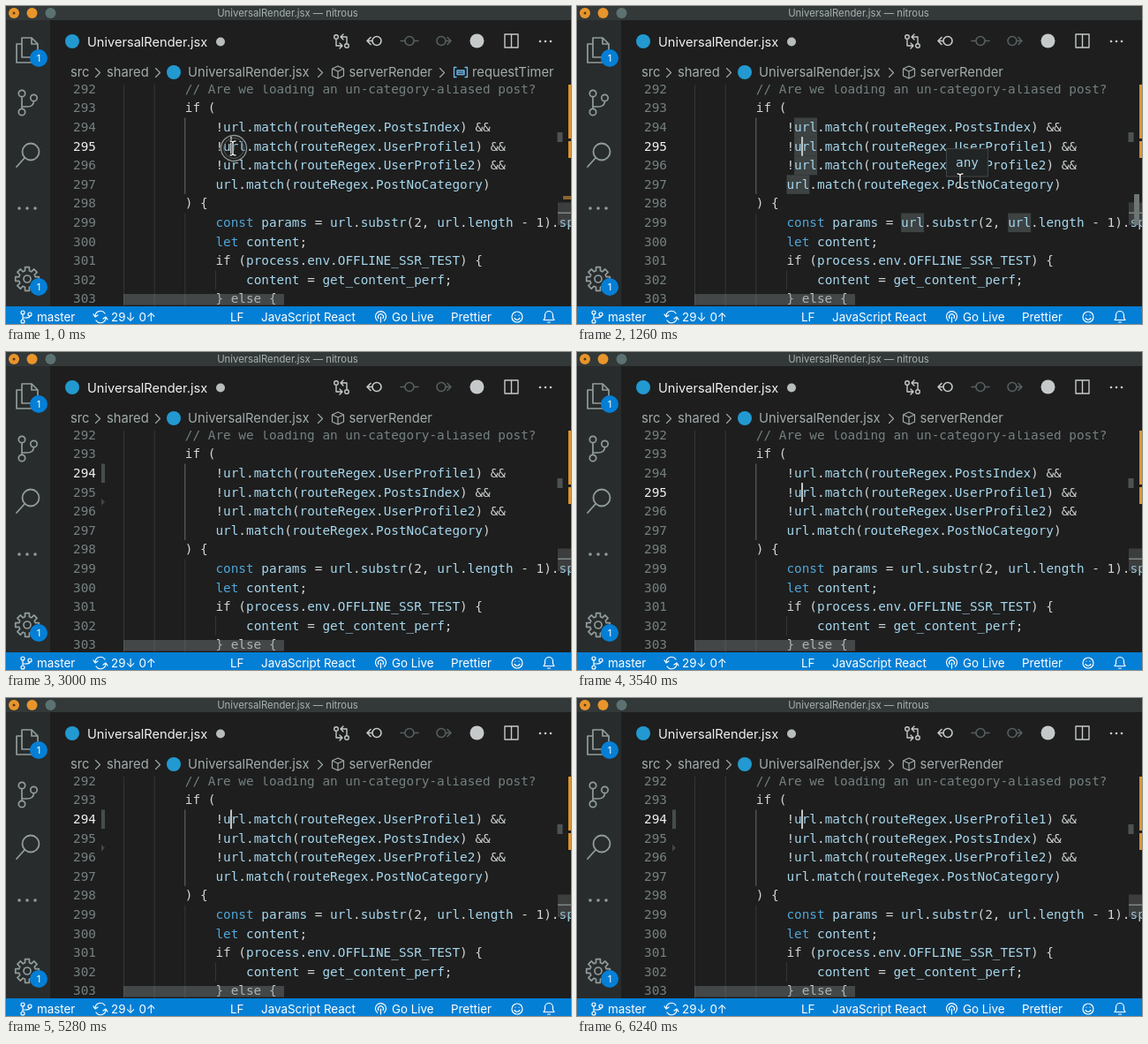
Recreate the animation shown at these times as an HTML page. Size 640 by 360 pixels, loop 6.3 s.

```html
<!DOCTYPE html>
<html lang="en">
<head>
<meta charset="utf-8">
<style>
html, body { margin: 0; width: 100%; height: 100%; overflow: hidden; background: #1e1e1e; }
svg { display: block; width: 640px; height: 360px; }
text { white-space: pre; }
.ui { font-family: Inter, "Open Sans", sans-serif; }
.mono { font: 14.37px "DejaVu Sans Mono", monospace; }
.line { fill: none; stroke-linecap: round; stroke-linejoin: round; }
</style>
</head>
<body>
<svg id="stage" viewBox="0 0 640 360" xmlns="http://www.w3.org/2000/svg"></svg>
<script>
const LOOP = 6300, STEP = 60;
const ROW = 21.6, CHAR = 8.65, FIRST = 292, TOP = 83.3;
const COL = { text: '#d0d4d4', name: '#a5d6ec', keyword: '#4fa6d9', dim: '#758080', bar: '#047fd6', mark: '#2299d0' };
const stage = document.getElementById('stage');

const rowTop = line => TOP + (line - FIRST) * ROW;
const baseline = line => rowTop(line) + 15.45;
const indentX = depth => 133.6 + depth * 4 * CHAR;

const rect = (x, y, w, h, fill, extra = '') =>
  `<rect x="${x}" y="${y}" width="${w}" height="${h}" fill="${fill}" ${extra}/>`;
const dot = (x, y, r, fill) => `<circle cx="${x}" cy="${y}" r="${r}" fill="${fill}"/>`;
const path = (d, color, width = 1.4, extra = '') =>
  `<path class="line" d="${d}" stroke="${color}" stroke-width="${width}" ${extra}/>`;
const ring = (x, y, r) => `M${x - r} ${y}a${r} ${r} 0 1 0 ${2 * r} 0a${r} ${r} 0 1 0 ${-2 * r} 0`;
const label = (x, y, size, fill, words, extra = '') =>
  `<text class="ui" x="${x}" y="${y}" font-size="${size}" fill="${fill}" ${extra}>${words}</text>`;

// Colours identifiers and keywords of one line of code.
const paint = code => code.replace(/[A-Za-z_]\w*|&/g, word => {
  if (word === '&') return '&amp;';
  if (/^(if|else)$/.test(word)) return word;
  const fill = /^(const|let)$/.test(word) ? COL.keyword : COL.name;
  return `<tspan fill="${fill}">${word}</tspan>`;
});
const codeText = (line, depth, body, attrs = '') =>
  `<text class="mono" x="${indentX(depth)}" y="${baseline(line)}" fill="${COL.text}" ${attrs}>${body}</text>`;

const condition = prop => paint(`!url.match(routeRegex.${prop}) &&`);
const fixedLines = [
  [293, 2, 'if ('],
  [297, 3, 'url.match(routeRegex.PostNoCategory)'],
  [298, 2, ') {'],
  [299, 3, 'const params = url.substr(2, url.length - 1).split'],
  [300, 3, 'let content;'],
  [301, 3, 'if (process.env.OFFLINE_SSR_TEST) {'],
  [302, 4, 'content = get_content_perf;'],
  [303, 3, '} else {']
];

function titleBar() {
  return rect(0, 0, 640, 16, '#333838') +
    dot(9, 8, 6, '#e8952c') + dot(9, 8, 1.5, '#5a3a10') + dot(29.5, 8, 6, '#e8952c') + dot(50.5, 8, 6, '#5c7272') +
    label(319, 12, 11.3, '#a8b2b2', 'UniversalRender.jsx — nitrous', 'text-anchor="middle"');
}

function badge(x, y) {
  return dot(x, y, 10, COL.bar) + label(x, y + 4, 11, '#fff', '1', 'text-anchor="middle"');
}

function gear(x, y, color) {
  const point = (angle, r) => `${x + r * Math.cos(angle)} ${y + r * Math.sin(angle)}`;
  const teeth = Array.from({ length: 8 }, (_, i) => {
    const a = i * Math.PI / 4;
    return [point(a - .26, 9.5), point(a - .18, 13.5), point(a + .18, 13.5), point(a + .26, 9.5)].join('L');
  });
  return path(`M${teeth.join('L')}Z${ring(x, y, 4)}`, color, 1.7);
}

function activityBar() {
  const c = '#929c9c';
  return rect(0, 16, 50, 324, '#282c2c') +
    path('M18 36H29L36 43V58H18ZM29 36V43H36M18 43H12V64H29V58', c, 1.7) + badge(37, 59) +
    path(ring(18, 99, 3.7) + ring(31.5, 104, 3.7) + ring(18, 120, 3.7) + 'M18 103V116M31.5 108Q31 114 24 114H18', c, 1.7) +
    path(ring(28, 165, 9.5) + 'M21 172L12 182', c, 1.8) +
    [15, 24, 33].map(x => dot(x, 229, 1.8, c)).join('') +
    gear(24, 309, c) + badge(37, 318);
}

function tabBar() {
  const c = '#c5c9c9', faint = '#566060';
  return dot(75, 40, 8, COL.mark) + label(92, 45.5, 14.6, '#f0f0f0', 'UniversalRender.jsx') +
    dot(243, 40.5, 5, '#b8bcbc') +
    path(ring(374, 35, 2.3) + ring(386, 45, 2.3) + 'M374 38V45H380M378 42L381 45L378 48M386 42V35H380M382 32L379 35L382 38', c) +
    path(ring(420, 39.5, 5) + 'M415 39.5H409M413 35.5L409 39.5L413 43.5', c, 1.6) +
    path(ring(457, 39.5, 5) + 'M452 39.5H447M462 39.5H467', faint, 1.6) +
    path(ring(493, 39.5, 5) + 'M498 39.5H504M500 35.5L504 39.5L500 43.5', faint, 1.6) +
    dot(533.5, 39.5, 8, c) +
    path('M565 32H580V47H565ZM572.5 32V47', c) +
    [605, 611, 617].map(x => dot(x, 40, 1.3, c)).join('');
}

function breadcrumbs() {
  const c = '#a3acac', y = 80, size = 14.75;
  const chevron = x => path(`M${x - 2.5} 70.5L${x + 2.5} 75.5L${x - 2.5} 80.5`, c, 1.1);
  return label(73, y, size, c, 'src') + chevron(104) + label(114, y, size, c, 'shared') + chevron(172) +
    dot(190, 75, 8, COL.mark) + label(206, y, size, c, 'UniversalRender.jsx') + chevron(356) +
    path('M369.5 71L376 68L382.5 71V79L376 82L369.5 79ZM369.5 71L376 74L382.5 71M376 74V82', c, 1.2) +
    label(388.5, y, size, c, 'serverRender') +
    `<g id="symbol">${chevron(494)}${path('M510 69.5H507.5V80.5H510M520 69.5H522.5V80.5H520M511 73H519V77.5H511ZM511 75.2H519', '#6bbcf0', 1.3)}` +
    label(528, y, size, c, 'requestTimer') + '</g>';
}

function guides() {
  const guide = (depth, from, to, color) =>
    rect(indentX(depth) - .5, rowTop(from), 1, (to - from + 1) * ROW, color);
  return guide(0, 292, 303, '#333838') + guide(1, 292, 303, '#333838') +
    guide(2, 294, 297, '#646c6c') + guide(2, 299, 303, '#333838') + guide(3, 302, 302, '#333838');
}

function wordMarks() {
  const spots = [[294, 1], [295, 1], [296, 1], [297, 0], [299, 15], [299, 29]];
  return spots.map(([line, col]) =>
    rect(indentX(3) + col * CHAR, rowTop(line), 3 * CHAR, ROW, '#3d4242')).join('');
}

function editor() {
  const numbers = Array.from({ length: 12 }, (_, i) =>
    `<text class="mono number" x="76" y="${baseline(FIRST + i)}" fill="${COL.dim}">${FIRST + i}</text>`).join('');
  const comment = codeText(292, 2, '// Are we loading an un-category-aliased post?', 'style="fill:#748080"');
  return `<clipPath id="view"><rect x="50" y="89" width="590" height="251"/></clipPath><g clip-path="url(#view)">` +
    guides() + `<g id="words">${wordMarks()}</g>` + numbers + comment +
    fixedLines.map(([line, depth, code]) => codeText(line, depth, paint(code))).join('') +
    [294, 295, 296].map(line => codeText(line, 3, '', 'data-condition')).join('') +
    `<g id="diff">${rect(108, 0, 4, ROW, '#464d4d')}<path id="removed" d="M108 -4L112 0L108 4Z" fill="#414646"/></g>` +
    rect(254, 0, 2, ROW, '#c0c4c4', 'id="caret"') +
    rect(133, 326, 182, 12.5, '#798080', 'opacity=".42"') + '</g>';
}

function ruler() {
  return rect(637, 89, 3, 61, '#dd962f') + rect(637, 153, 3, 19, '#dd962f') +
    rect(625, 222.5, 15, 25.5, '#798080', 'opacity=".33"') + rect(625, 233.5, 15, 1.5, '#7d8686') +
    rect(624.5, 143, 6, 11, '#4d5353') +
    rect(631, 215, 9, 4, '#8a6430', 'id="warning"') + rect(631, 213, 6, 35, '#6d7575', 'id="hits"');
}

function statusBar() {
  const w = '#fff', item = (x, words) => label(x, 356.5, 13.4, w, words);
  return rect(0, 340, 640, 20, COL.bar) +
    path(ring(19, 347, 2) + ring(27, 349, 2) + ring(19, 357, 2) + 'M19 349V355M27 351Q27 353 22 353H19', w, 1.2) +
    item(35, 'master') +
    path('M101 351A6 6 0 0 1 112 348M113 353A6 6 0 0 1 102 356M99 349L101 352L104 350M115 355L113 352L110 354', w, 1.2) +
    item(119, '29↓ 0↑') + item(254, 'LF') + item(289, 'JavaScript React') +
    path('M420.5 356A6 6 0 1 1 428.5 356M422 353.5A3 3 0 1 1 427 353.5M424.5 352V358', w, 1.2) +
    item(437, 'Go Live') + item(504, 'Prettier') +
    path(ring(579, 352, 6) + 'M576 353.5Q579 357 582 353.5M577 350V350.1M581 350V350.1', w, 1.2) +
    path('M609 355.5H621L619.5 353V350A4.5 4.5 0 0 0 610.5 350V353ZM613.5 358H616.5', w, 1.2);
}

function overlays() {
  const beam = 'M-3 -8Q0 -8 0 -6Q0 -8 3 -8M0 -6V6M-3 8Q0 8 0 6Q0 8 3 8';
  return `<g id="tip">${rect(418.5, 161.5, 47, 31.5, '#222525', 'stroke="#414646"')}` +
    `<text class="mono" x="429" y="182" fill="${COL.name}">any</text></g>` +
    `<g id="click">${path(ring(258, 161, 14.5), '#8c9494', 1.3)}${path(ring(258, 161, 11.5), '#586060', 1)}</g>` +
    `<g id="mouse">${path(beam, '#111', 3)}${path(beam, '#eee', 1.4)}</g>`;
}

stage.innerHTML = rect(0, 0, 640, 360, '#1e1e1e') + titleBar() + tabBar() + breadcrumbs() +
  editor() + ruler() + activityBar() + statusBar() + overlays();

const part = id => document.getElementById(id);
const numbers = [...stage.querySelectorAll('.number')];
const conditions = [...stage.querySelectorAll('[data-condition]')];
const show = (id, visible) => part(id).setAttribute('visibility', visible ? 'visible' : 'hidden');
const ease = p => p * p * (3 - 2 * p);
const progress = (t, from, to) => Math.min(1, Math.max(0, (t - from) / (to - from)));

// Each entry: when the caret's line reaches that line number.
const moves = [[-60, 295], [2460, 294], [3360, 295], [3900, 296], [4560, 295], [4980, 294]];
const lastMove = t => moves.filter(([at]) => at <= t).pop();
let shownLine;

function arrange(line) {
  if (line === shownLine) return;
  shownLine = line;
  const props = ['PostsIndex', 'UserProfile2'];
  props.splice(line - 294, 0, 'UserProfile1');
  conditions.forEach((node, i) => { node.innerHTML = condition(props[i]); });
  numbers.forEach((node, i) => node.setAttribute('fill', FIRST + i === line ? '#f0f0f0' : COL.dim));
  part('caret').setAttribute('y', rowTop(line));
}

function render(time) {
  const t = Math.floor((time % LOOP) / STEP) * STEP;
  const [movedAt, line] = lastMove(t);
  const beforeTyping = t < moves[1][0];
  arrange(line);
  show('caret', (t - movedAt) % 1000 < 500);

  show('symbol', t < 180);
  show('warning', t < 240);
  show('words', t >= 240 && beforeTyping);
  show('hits', t >= 240 && beforeTyping);

  const go = ease(progress(t, 60, 480));
  part('mouse').setAttribute('transform', `translate(${257 + 177 * go} ${161 + 37 * go})`);
  show('mouse', beforeTyping);
  part('click').setAttribute('opacity', 1 - progress(t, 0, 240));
  part('tip').setAttribute('opacity', beforeTyping ? progress(t, 900, 1020) : 0);

  // The gutter marks trail each edit slightly.
  const diffLine = lastMove(Math.max(0, t - 180))[1];
  show('diff', diffLine !== 295);
  const added = diffLine === 294 ? 294 : 295;
  part('diff').firstChild.setAttribute('y', rowTop(added));
  part('removed').setAttribute('transform', `translate(0 ${rowTop(added + 2)})`);
}

const start = performance.now();
function frame() {
  render(performance.now() - start);
  requestAnimationFrame(frame);
}
frame();
</script>
</body>
</html>
```
